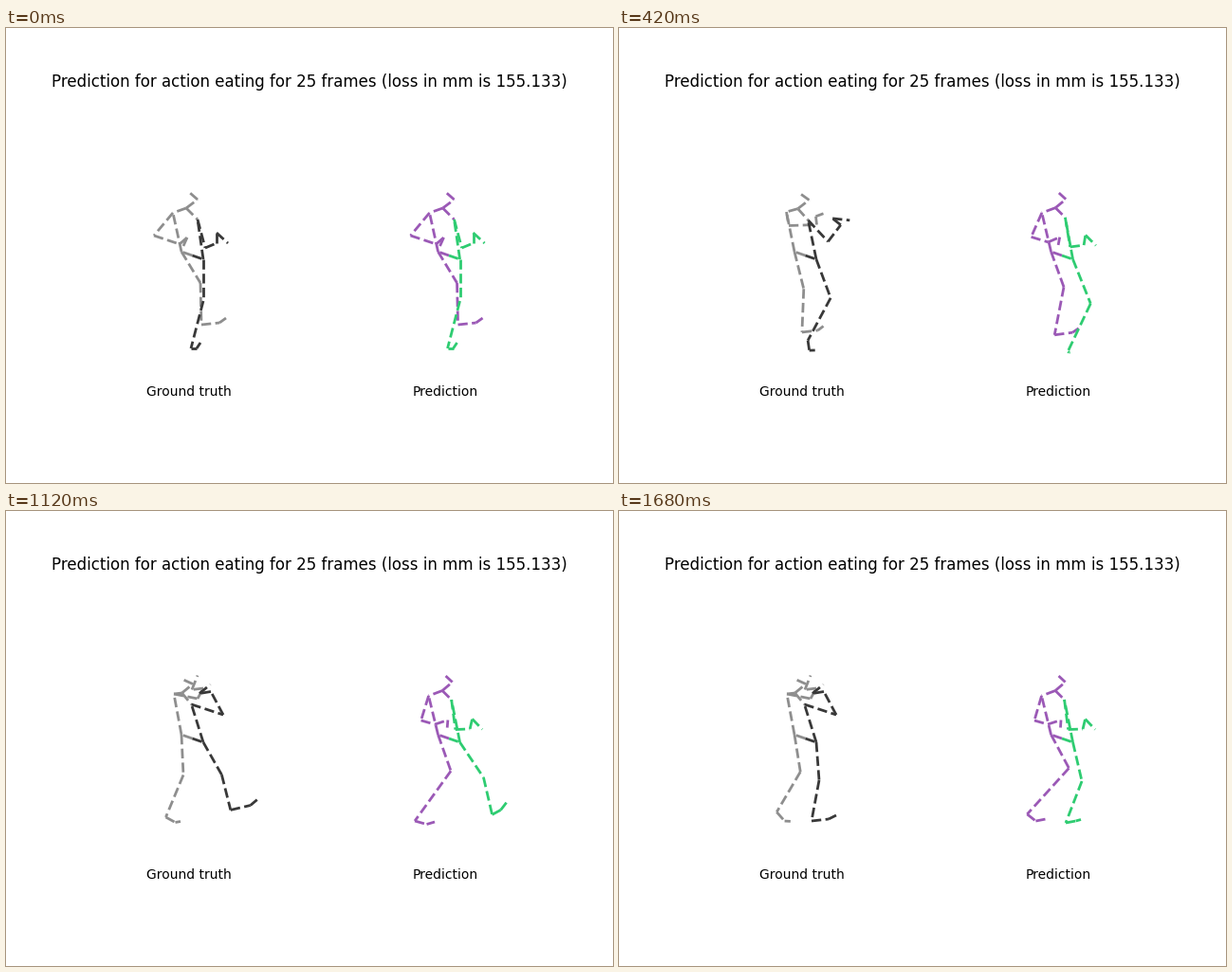
Animation, 640 px wide and 480 px high, one loop 1.75 s. Source, as a matplotlib script:

```python
import numpy as np
import matplotlib.pyplot as plt
from matplotlib.animation import FuncAnimation

W, H, DPI = 640, 480, 100
FRAMES, INTERVAL = 25, 70
T = np.arange(FRAMES)[:, None, None]
SHIFT = 270.545  # distance between the two panels


def pose(*xy):
    return np.array(xy, float).reshape(-1, 2)


def ease(u):
    u = np.clip(u, 0, 1)
    return u * u * (3 - 2 * u)


def through(times, *poses):
    """Ease from each pose to the next, resting at the given times."""
    track = poses[0] + 0 * T
    for t0, t1, a, b in zip(times, times[1:], poses, poses[1:]):
        track = track + (b - a) * ease((T - t0) / (t1 - t0))
    return track


def arc(start, end, span, bulge=0):
    """Ease from start to end along a path that bulges half way."""
    u = np.clip(T / span, 0, 1)
    return start + (end - start) * ease(u) + bulge * np.sin(np.pi * u)


def decay(start, end):
    return end + (start - end) * np.exp(-T / 5)


# Joints run outward from the body; both figures share the first pose
PELVIS = pose(196.5, 240, 185, 236, 208, 244)
HEAD = pose(190, 190, 202, 181, 194, 174)
L_ARM = pose(176, 195, 156, 219, 183, 228, 191, 221, 187, 230)
R_ARM = pose(202, 202, 210, 232, 222, 227, 222, 216, 234, 227)
L_LEG = pose(205, 269, 206, 313, 225, 311, 232, 306)
R_LEG = pose(208, 288, 195, 338, 201, 338, 205, 332)

# The left leg trails back, then returns to its first stride;
# the right leg lifts, swings forward and lands
L_TIMES = 0, 11, 21, 30.5
R_TIMES = 0, 5, 15, 24

truth = np.hstack([
    PELVIS + 0 * T,
    arc(HEAD, pose(185.5, 192, 197, 182.5, 187, 178), 16),
    arc(L_ARM, pose(177, 193, 202, 198, 208, 187, 196, 188.5, 202, 173.5),
        12, pose(0, 0, 0, 0, 13, 0, 14, -6, 21, -6)),
    arc(R_ARM, pose(195.5, 204, 229, 215, 216, 190.5, 204, 192.5, 215.5, 183),
        14, pose(0, 0, 3, 0, 14.5, -5, 10.5, -6, 17, -7)),
    through(L_TIMES, L_LEG,
            pose(187, 280, 183, 327, 198, 325, 203, 321),
            pose(187, 277, 154, 319, 159, 332, 165, 334), L_LEG),
    through(R_TIMES, R_LEG,
            pose(223, 285, 198, 330, 199, 341, 205, 341),
            pose(228, 278, 238, 315, 259, 310, 266, 304),
            pose(211, 284, 203, 327, 221, 325, 229, 321)),
])

guess = np.hstack([
    PELVIS + 0 * T,
    decay(HEAD, pose(189.5, 189.5, 200, 180.5, 193, 174)),
    decay(L_ARM, pose(175, 195, 167.5, 221, 181.5, 225,
                      195.5, 220.5, 195, 228.5)),
    decay(R_ARM, pose(199, 199, 203, 230.5, 218.5, 230,
                      221, 219.5, 231.5, 230.5)),
    through(L_TIMES, L_LEG,
            pose(193.5, 276.5, 175.5, 332, 194.5, 329, 200.5, 325),
            pose(203.5, 272, 145.5, 322, 151.5, 332, 162.5, 331), L_LEG),
    through(R_TIMES, R_LEG,
            pose(226.5, 291, 201.5, 342, 202.5, 343, 203.5, 343),
            pose(233.5, 281, 243.5, 320, 252.5, 315, 258.5, 307),
            pose(217.5, 285, 200.5, 329, 211, 327, 216.5, 325.5)),
]) + (SHIFT, 0)

# Joint numbers in the stacked tracks, joined up as chains of bones
ROOT, L_HIP, R_HIP, NECK, NOSE, TOP = range(6)
l_arm, r_arm = [*range(6, 11)], [*range(11, 16)]
l_leg, r_leg = [*range(16, 20)], [*range(20, 24)]
LEFT = [[ROOT, L_HIP] + l_leg, [NECK, NOSE, TOP], [NECK, r_arm[0]],
        [L_HIP, l_arm[0]], [NECK] + l_arm]
RIGHT = [[ROOT, R_HIP] + r_leg, [R_HIP] + r_arm]

fig = plt.figure(figsize=(W / DPI, H / DPI), dpi=DPI, facecolor="white")
ax = fig.add_axes([0, 0, 1, 1])
ax.set_xlim(0, W)
ax.set_ylim(H, 0)
ax.axis("off")


def label(x, y, text, size):
    ax.text(x, y, text, fontsize=size, family="DejaVu Sans",
            color="black", ha="center", va="baseline")


label(320, 62, "Prediction for action eating for 25 frames "
      "(loss in mm is 155.133)", 12)
label(192.727, 388, "Ground truth", 10)
label(192.727 + SHIFT, 388, "Prediction", 10)

bones = []
for track, colors in ((truth, ("#8e8e8e", "#383838")),
                      (guess, ("#9b59b6", "#2ecc71"))):
    for chains, color in zip((LEFT, RIGHT), colors):
        for chain in chains:
            for ends in zip(chain, chain[1:]):
                line, = ax.plot([], [], "--", lw=2, color=color)
                bones.append((line, track[:, ends]))


def draw(i):
    for line, ends in bones:
        line.set_data(ends[i, :, 0], ends[i, :, 1])
    return [line for line, _ in bones]


anim = FuncAnimation(fig, draw, frames=FRAMES, interval=INTERVAL,
                     repeat=True, repeat_delay=0, blit=False)
plt.show()
```
